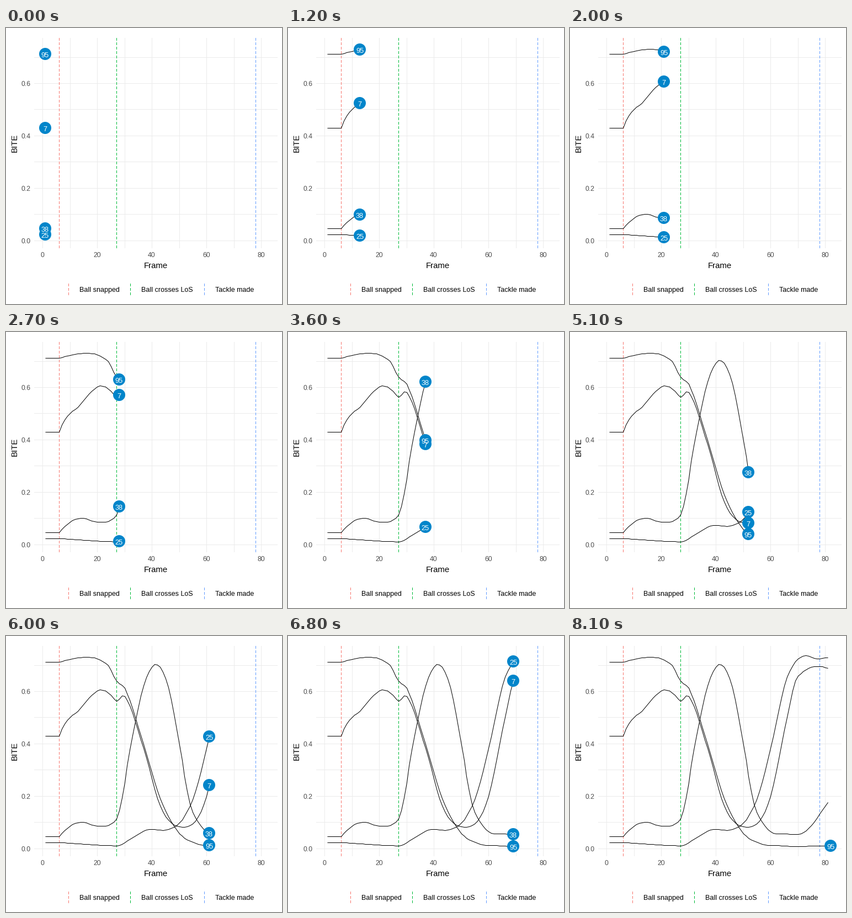
Recreate the animation shown at these times as a matplotlib script. Size 500 by 500 pixels, loop 8.2 s.

```python
import matplotlib.pyplot as plt
import numpy as np
from matplotlib.animation import FuncAnimation
from matplotlib.patches import Circle

SIZE, DPI = 500, 100
LAST = 82
PX = 72 / DPI  # one pixel in points
LEFT, RIGHT, TOP, BOTTOM = 51, 492, 18, 399
GRID, TICK, BLUE = "#EBEBEB", "#4D4D4D", "#0085CA"
EVENTS = (  # name, frame, colour, legend position
    ("Ball snapped", 6, "#F8766D", 113),
    ("Ball crosses LoS", 27, "#00BA38", 225),
    ("Tackle made", 78, "#619CFF", 359),
)

plt.rcParams["font.family"] = "Liberation Sans"


def x_pos(frame):
    return np.floor(66.5 + 4.951 * frame)


def y_pos(value):
    return np.floor(385.2 - 474.5 * value)


def smooth(*points):
    """Cubic curve through (frame, value) points, flat before the first one."""
    kx, ky = np.array(points).T
    slope = np.gradient(ky, kx)
    x = np.arange(1, LAST + 1).clip(kx[0], kx[-1])
    k = np.clip(np.searchsorted(kx, x, side="right") - 1, 0, len(kx) - 2)
    h = kx[k + 1] - kx[k]
    t = (x - kx[k]) / h
    ease = t * t * (3 - 2 * t)
    bend = h * t * (1 - t) * (slope[k] * (1 - t) - slope[k + 1] * t)
    return ky[k] + (ky[k + 1] - ky[k]) * ease + bend


# player: (last frame, value over time)
PLAYERS = {
    "7": (81, smooth(
        (6, .4295), (7, .456), (13, .525), (22, .605), (25, .586), (27, .562),
        (29, .583), (37, .382), (43, .163), (50, .0835), (60, .2), (66, .502),
        (69, .639), (72, .675), (78, .695), (81, .689))),
    "25": (81, smooth(
        (6, .0233), (26, .0108), (27, .0105), (32, .035), (38, .071), (46, .073),
        (50, .0975), (56, .2175), (60, .382), (66, .654), (69, .713), (72, .735),
        (77, .725), (81, .729))),
    "38": (81, smooth(
        (6, .0465), (7, .059), (13, .099), (21, .0855), (25, .094), (27, .114),
        (33, .432), (37, .622), (42, .702), (46, .614), (50, .396), (54, .171),
        (58, .0865), (66, .0555), (73, .0675), (81, .177))),
    "95": (82, smooth(
        (6, .7125), (14, .7295), (21, .72), (24, .698), (27, .639), (30, .612),
        (36, .432), (43, .192), (49, .07), (56, .02), (64, .0105), (82, .0105))),
}

fig = plt.figure(figsize=(SIZE / DPI, SIZE / DPI), dpi=DPI, facecolor="white")
ax = fig.add_axes([0, 0, 1, 1])
ax.set(xlim=(0, SIZE), ylim=(SIZE, 0))
ax.axis("off")


def stroke(xs, ys, color, z, style="-"):
    return ax.plot(xs, ys, color=color, lw=PX, ls=style, zorder=z, snap=False,
                   solid_capstyle="butt", dash_capstyle="butt")[0]


def dashed(x, y0, y1, color):
    stroke([x + 0.5] * 2, [y0, y1], color, 2, (0, (5, 3)))


def label(x, y, text, size, color="black", align="center", **kw):
    return ax.text(x, y, text, fontsize=size * PX, color=color, ha=align,
                   va="baseline", **kw)


for i in range(9):
    x = x_pos(10 * i)
    stroke([x + 0.5] * 2, [TOP, BOTTOM], GRID, 1)
    if i % 2 == 0:
        label(x, 415, str(10 * i), 12.2, TICK)
for i in range(8):
    y = y_pos(i / 10)
    stroke([LEFT, RIGHT], [y + 0.5] * 2, GRID, 1)
    if i % 2 == 0:
        label(45, y + 5, f"{i / 10:.1f}", 12.2, TICK, "right")

label(271, 435, "Frame", 15)
label(20, 208.5, "BITE", 15, rotation=90, rotation_mode="anchor")

for text, frame, color, x in EVENTS:
    dashed(x_pos(frame), BOTTOM, TOP, color)
    dashed(x, 484, 463, color)
    label(x + 20, 478, text, 12.5, align="left")

xs = x_pos(np.arange(1, LAST + 1))
tracks = []
for name, (last, values) in PLAYERS.items():
    line = stroke([], [], "black", 3)
    dot = ax.add_patch(Circle((0, 0), 11, fc=BLUE, lw=0, zorder=4))
    tag = label(0, 0, name, 12.8, "white", zorder=5)
    tracks.append((last, y_pos(values), line, dot, tag))


def update(i):
    for last, ys, line, dot, tag in tracks:
        n = min(i + 1, last)
        line.set_data(xs[:n] + 0.5, ys[:n] + 0.5)
        dot.center = xs[i], ys[i]
        tag.set_position((xs[i], ys[i] + 6))
        for part in (dot, tag):
            part.set_visible(i < last)
    return [part for row in tracks for part in row[2:]]


anim = FuncAnimation(fig, update, frames=LAST, interval=100, repeat=True,
                     repeat_delay=0, blit=False)
plt.show()
```
